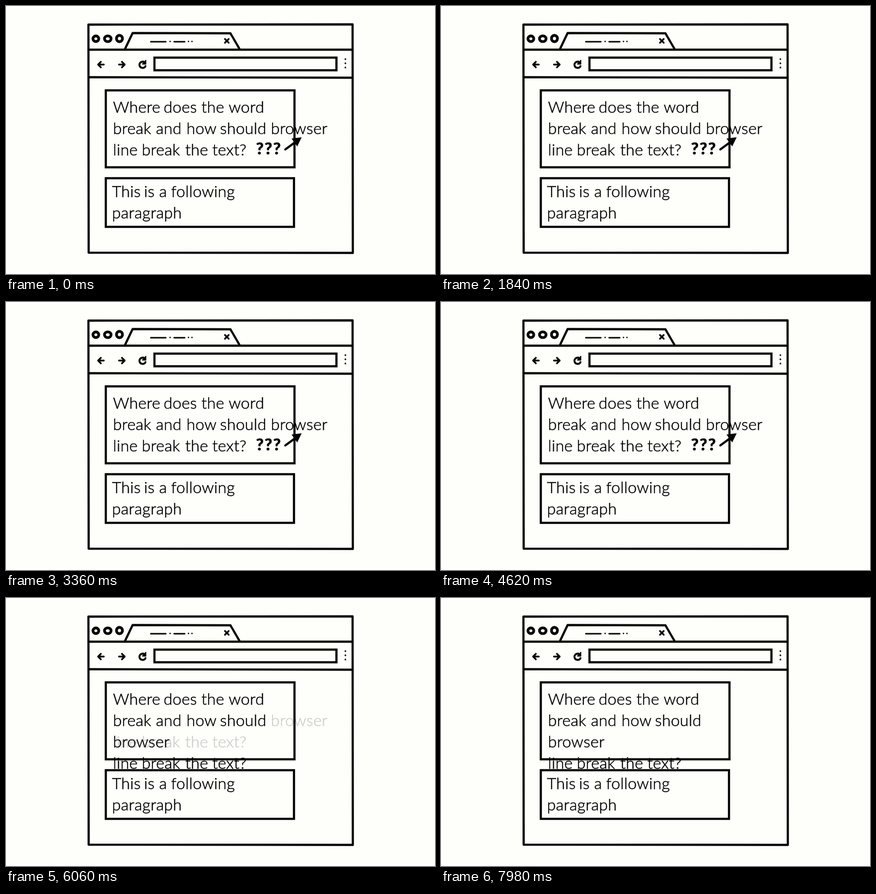
An HTML page for the animation above (8 s loop, 864 px wide and 540 px high).

```html
<!DOCTYPE html>
<html lang="en">
<head>
<meta charset="utf-8">
<title>Line breaking in a browser</title>
<style>
  html, body { margin: 0; width: 100%; height: 100%; overflow: hidden; background: #fefefb; }
  svg { display: block; width: 864px; height: 540px; }
  .ink { fill: none; stroke: #040404; stroke-width: 4.4; stroke-linecap: round; stroke-linejoin: round; }
  .box { stroke-linejoin: miter; }
  text { font: 300 32px Lato, "Open Sans", sans-serif; letter-spacing: .35px; fill: #040404; stroke: #040404; stroke-width: .6; }
  .marks { font-weight: 800; font-size: 33px; letter-spacing: 1.9px; }
</style>
</head>
<body>
<svg viewBox="0 0 864 540">
  <g class="ink">
    <path d="M166 37.500L698 37L698.500 497.500L166.500 497Z"/>
    <path d="M167 88H698M167 143.500L698 144.500"/>
    <path d="M240 86L255 54.500L452 55L470 86"/>
    <g stroke-width="5.600">
      <ellipse cx="181" cy="66" rx="5.800" ry="5.600"/>
      <ellipse cx="205" cy="66" rx="6.600" ry="5.800"/>
      <ellipse cx="228.500" cy="65.500" rx="6" ry="6.400"/>
    </g>
    <path stroke-width="2.800" d="M291.500 72H322M330.500 71.500h.1M338.500 72H360M367.500 71.500h.1M374.500 71.500h.1"/>
    <path stroke-width="3.600" d="M441 66.500L448.500 74M448.500 66.500L441 74"/>
    <path stroke-width="3.600" d="M197 118H185.500M191 112.500L185.500 118L191 123.500"/>
    <path stroke-width="3.600" d="M227.500 118H239M233.500 112.500L239 118L233.500 123.500"/>
    <path stroke-width="3.800" d="M276.500 112C271 112 268.500 115.500 268.800 119C269.500 126 279.500 126.500 281 121"/>
    <path stroke-width="2" fill="#040404" d="M281.500 109.500V117H275Z"/>
    <path stroke-width="3.400" d="M683.500 107h.1M683.500 115.500h.1M683.500 124h.1"/>
    <g class="box">
      <rect x="299" y="104" width="366.500" height="25.500"/>
      <rect x="201" y="170" width="380" height="155"/>
      <rect x="201" y="347" width="379" height="98"/>
    </g>
  </g>
  <g id="fixed"></g>
  <g id="before"></g>
  <g id="after"></g>
  <g id="hint">
    <text class="marks" x="503.500" y="299">???</text>
    <path class="ink" stroke-linecap="butt" d="M562.500 289L583 274"/>
    <path fill="#040404" d="M595.500 264.500L575 267L586.500 283Z"/>
  </g>
</svg>
<script>
const LOOP = 8000;
const $ = id => document.getElementById(id);

// Places each word of a line at its own left edge.
function line(parent, y, words, xs) {
  words.split(' ').forEach((word, i) => {
    const t = document.createElementNS('http://www.w3.org/2000/svg', 'text');
    t.setAttribute('x', xs[i]);
    t.setAttribute('y', y);
    t.textContent = word;
    $(parent).append(t);
  });
}

const lastLine = ['line break the text?', [215.5, 273.5, 361, 415.5]];
line('fixed', 215, 'Where does the word', [215.5, 317.5, 393.5, 448.5]);
line('fixed', 257.5, 'break and how should', [215.5, 302, 363.5, 431]);
line('fixed', 385, 'This is a following', [213.5, 278, 308.5, 332.5]);
line('fixed', 428, 'paragraph', [213.5]);
line('before', 257.5, 'browser', [533.5]);
line('before', 300.5, ...lastLine);
line('after', 300.5, 'browser', [215.5]);
line('after', 343.5, ...lastLine);

const ramp = (t, from, to) => Math.min(1, Math.max(0, (t - from) / (to - from)));

function draw(t) {
  $('hint').setAttribute('opacity', 1 - ramp(t, 5220, 5580));
  $('after').setAttribute('opacity', ramp(t, 5660, 6000));
  $('before').setAttribute('opacity', 1 - ramp(t, 5800, 6120));
}

const start = performance.now();
function tick(now) {
  draw(Math.max(0, now - start) % LOOP);
  requestAnimationFrame(tick);
}
draw(0);
requestAnimationFrame(tick);
</script>
</body>
</html>
```
